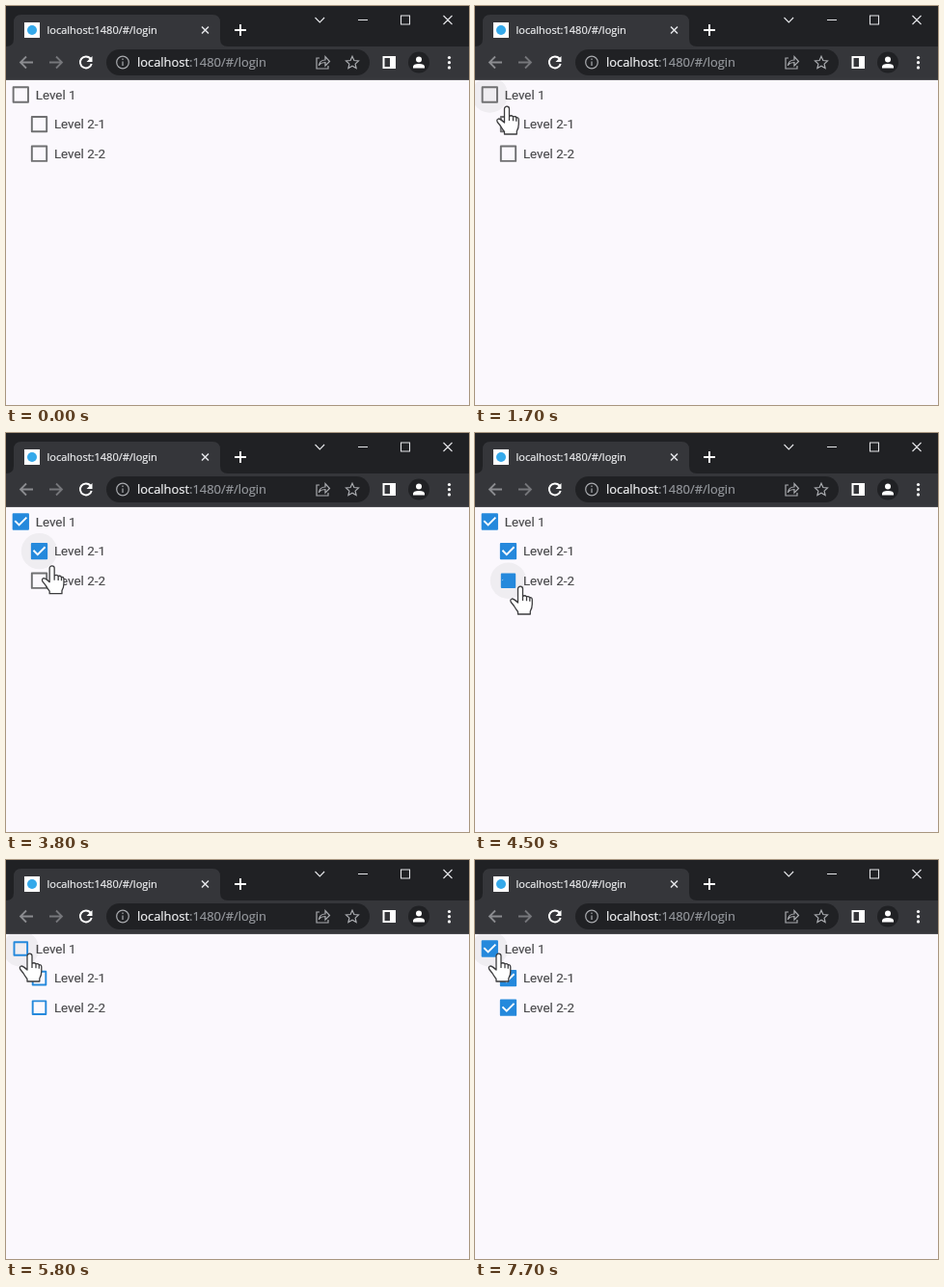
Animation, 480 px wide and 414 px high, one loop 8 s. Source, as an HTML page:

```html
<!DOCTYPE html>
<html lang="en">
<head>
<meta charset="utf-8">
<style>
html, body { margin: 0; width: 100%; height: 100%; overflow: hidden; background: #fbf8fd; }
svg { display: block; }
text { white-space: pre; }
.ui { font-family: "Open Sans", "Noto Sans", sans-serif; fill: #f1f2f4; stroke: #f1f2f4; stroke-width: .2; }
.ui .dim { fill: #96999e; stroke: #96999e; }
.row { font: 13.4px Roboto, sans-serif; fill: #49494b; stroke: #49494b; stroke-width: .15; }
.line { fill: none; stroke: #e4e5e8; stroke-width: 1.5; }
</style>
</head>
<body>
<svg width="480" height="414" viewBox="0 0 480 414">
  <rect width="480" height="414" fill="#fbf8fd"/>
  <g id="rows"></g>

  <rect width="480" height="43" fill="#202124"/>
  <path d="M0 42q8 0 8-8V17q0-8 8-8H214q8 0 8 8V34q0 8 8 8H480V76H0z" fill="#35363a"/>
  <rect y="76" width="480" height="1" fill="#4b4c50"/>
  <rect x="19" y="17" width="16" height="16" fill="#fff"/>
  <circle cx="27" cy="25" r="5" fill="#35a9ea"/>
  <text class="ui" x="42.5" y="29" font-size="11">localhost:1480/#/login</text>

  <g class="line">
    <path d="M203 21.5l7 7m0-7l-7 7"/>
    <path d="M237 25h12m-6-6v12" stroke="#fff" stroke-width="2"/>
    <path d="M320.5 12l4.8 5 4.8-5M365 14.5h10M409.5 10h9v9h-9zM453.5 10l9 9m0-9l-9 9" stroke-width="1.1"/>
    <path d="M28 58.5H15m6-6l-6 6 6 6" stroke="#8b8c90" stroke-width="1.8"/>
    <path d="M45 58.5h13m-6-6l6 6-6 6" stroke="#76777b" stroke-width="1.8"/>
    <path d="M87.5 54.5a6 6 0 1 0 1.2 5.5" stroke="#fff" stroke-width="2"/>
    <path d="M89.5 52v6h-6z" fill="#fff" stroke="none"/>
  </g>

  <rect x="104" y="45" width="273" height="27" rx="13.5" fill="#202124"/>
  <text class="ui" x="136" y="63" font-size="12.9">localhost<tspan class="dim">:1480/#/login</tspan></text>
  <g class="line">
    <g stroke="#a9abaf" stroke-width="1.2">
      <circle cx="121" cy="58.5" r="6.3"/>
      <path d="M121 57.5v4.5m0-7.5v1.5"/>
      <path d="M325 54h-3v11h12v-3M324.5 62q.5-6 6.5-6v-3.5l4.5 5-4.5 4.5v-3.5q-4 0-6.5 2.5z"/>
      <path d="M359 52.3l1.9 4.2 4.6.5-3.4 3.1 1 4.5-4.1-2.3-4.1 2.3 1-4.5-3.4-3.1 4.6-.5z"/>
    </g>
    <rect x="391.5" y="53" width="11.5" height="11" stroke="#fff" stroke-width="2"/>
    <path d="M398 52h6v13h-6z" fill="#fff" stroke="none"/>
  </g>
  <circle cx="428" cy="58.5" r="11" fill="#202124"/>
  <g fill="#fff">
    <circle cx="428" cy="55.5" r="3"/>
    <path d="M422 64.5v-1.5q0-3 6-3t6 3v1.5z"/>
    <circle cx="459.5" cy="53.5" r="1.6"/>
    <circle cx="459.5" cy="58.7" r="1.6"/>
    <circle cx="459.5" cy="63.9" r="1.6"/>
  </g>

  <g id="cursor" fill="#fff" stroke="#3c3c3e" stroke-width="1.3" stroke-linejoin="round">
    <path id="arrow" d="M0 0V22l5-5 3.5 8 4-1.7-3.5-7.8h7z"/>
    <path id="hand" d="M-2.5 17.5V3.2a2.5 2.5 0 0 1 5 0V11q2-1.6 4 .3q2-.7 3.3 .9q2.5-.3 2.5 2.3V19q0 4-2 7.5V29.500H-2.500V27q-2-2.500-4-6l-3.200-4q-1.300-2.800 1-3.500q2 0 6.200 4zM2.500 11v4.500M6.500 11.300v4.500M9.800 12.200v4"/>
  </g>
</svg>
<script>
const LOOP = 8000, STEP = 100, TOP = 92, PITCH = 30.6;
const GREY = [112, 112, 114], BLUE = [37, 137, 220];
const $ = id => document.getElementById(id);

// Clicking the parent row toggles all three boxes.
const toggles = [[5600, 1], [5800, .45], [6000, .45], [6100, .9], [6400, .9], [6800, 0],
  [7000, 0], [7200, .85], [7600, .85], [7700, 1]];
const first = [[3200, 0], [3600, 1], ...toggles];
const rows = [
  { label: 'Level 1', x: 15.3, keys: first },
  { label: 'Level 2-1', x: 34.5, keys: first },
  { label: 'Level 2-2', x: 34.5, keys: [[4300, 0], [4500, .51], [4800, .51], [4900, 1], ...toggles] }
];
const path = [[1100, 430, 268], [1300, 270, 200], [1500, 95, 130], [1700, 33, 103.5],
  [1900, 30, 92], [2000, 29, 91], [2400, 29, 91], [2800, 48, 126.5], [3700, 48, 126.5],
  [4000, 47, 158.5], [4800, 47, 158.5], [5400, 24.5, 96.5]];

function at(keys, t, col = 1) {
  const i = keys.findIndex(k => k[0] > t);
  if (i === 0) return keys[0][col];
  if (i < 0) return keys[keys.length - 1][col];
  const a = keys[i - 1], b = keys[i];
  return a[col] + (b[col] - a[col]) * (t - a[0]) / (b[0] - a[0]);
}

$('rows').innerHTML = rows.map((r, i) => `
  <g transform="translate(${r.x} ${TOP + i * PITCH})">
    <circle r="18.7" fill="#efedf1"/>
    <g transform="scale(.96)">
      <rect stroke-width="2" stroke-linejoin="round"/>
      <path d="M-6.3-.9L-1.8 3.6 6.3-4.5" pathLength="1" fill="none" stroke="#fff" stroke-width="2"/>
    </g>
    <text class="row" x="15.4" y="4.8">${r.label}</text>
  </g>`).join('');
rows.forEach((r, i) => {
  const group = $('rows').children[i];
  r.halo = group.querySelector('circle');
  r.box = group.querySelector('rect');
  r.tick = group.querySelector('path');
});

function set(el, attrs) {
  for (const k in attrs) el.setAttribute(k, attrs[k]);
}

function drawBox(r, v) {
  const size = 14 + Math.abs(v - .5) * 4;
  const mix = Math.min(1, v * 4);
  const color = `rgb(${GREY.map((g, i) => g + (BLUE[i] - g) * mix)})`;
  set(r.box, { x: -size / 2, y: -size / 2, width: size, height: size,
    stroke: color, fill: v > .5 ? color : 'none' });
  set(r.tick, { 'stroke-dasharray': `${Math.max(0, v * 2 - 1)} 2` });
}

function draw(now) {
  const t = Math.floor(now % LOOP / STEP) * STEP;
  const shown = t >= path[0][0];
  const x = at(path, t, 1), y = at(path, t, 2);
  const near = Math.round((y - TOP) / PITCH);
  let over = false;
  rows.forEach((r, i) => {
    const hover = shown && i === near && Math.abs(x - r.x) < 20;
    over ||= hover;
    r.halo.style.display = hover ? '' : 'none';
    drawBox(r, at(r.keys, t));
  });
  set($('cursor'), { transform: `translate(${x} ${y})` });
  $('cursor').style.display = shown ? '' : 'none';
  $('hand').style.display = over ? '' : 'none';
  $('arrow').style.display = over ? 'none' : '';
}

const start = performance.now();
function tick() {
  draw(performance.now() - start);
  requestAnimationFrame(tick);
}
tick();
</script>
</body>
</html>
```
